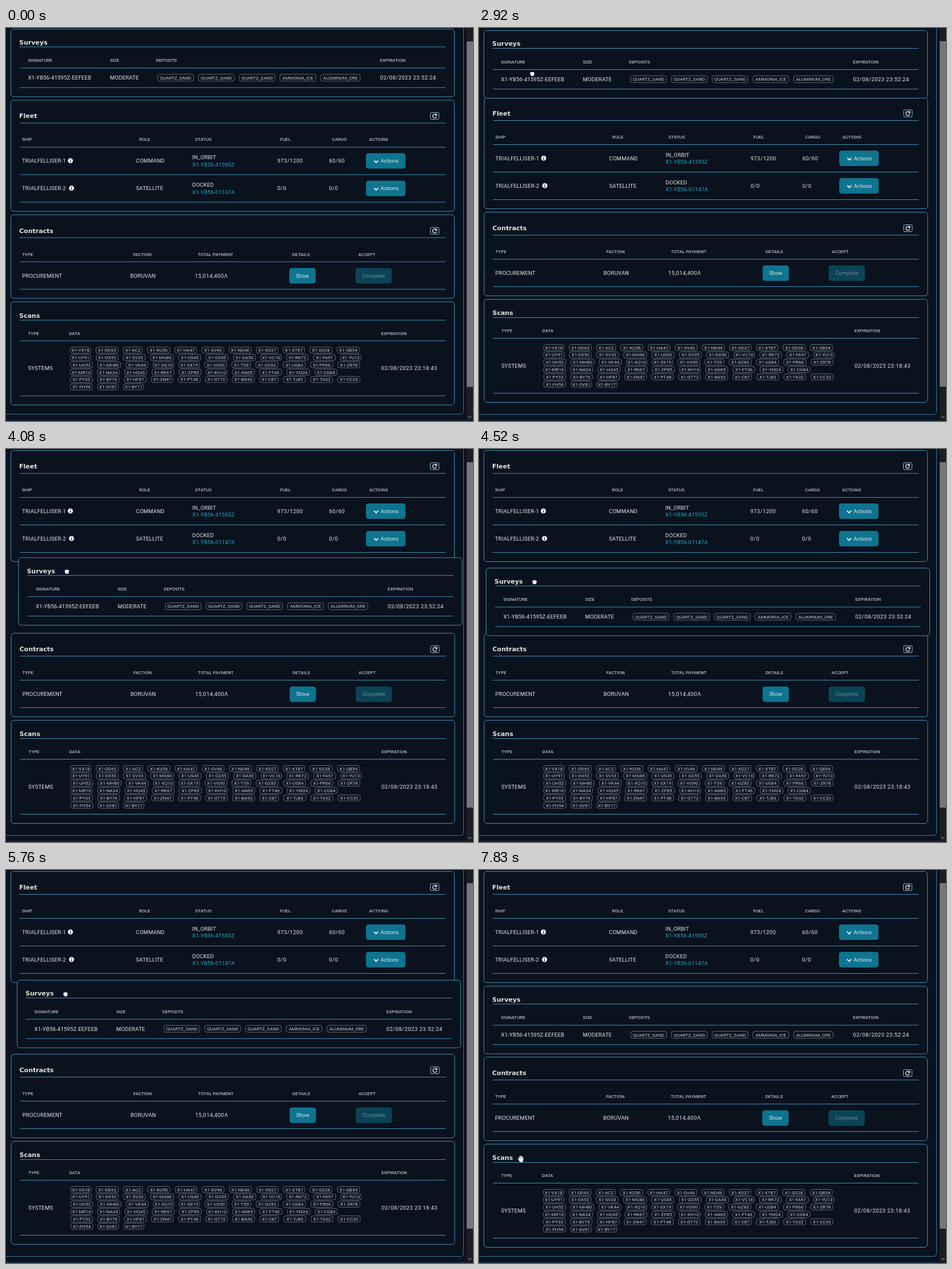
These frames come from a looping animation (816x686 px, 8000 ms). An HTML page:

```html
<!DOCTYPE html>
<html lang="en">
<head>
<meta charset="utf-8">
<title>Fleet dashboard</title>
<style>
html, body { margin: 0; width: 100%; height: 100%; overflow: hidden; background: #0a121e; }
svg { display: block; }
text { font-family: Roboto, "Liberation Sans", sans-serif; fill: #e4e6e8; white-space: pre; }
.title { font-family: "DejaVu Sans", sans-serif; font-weight: bold; fill: #dfe6dc; }
.num { letter-spacing: .4px; }
.cell { letter-spacing: .14px; }
.link { fill: #25a3c4; letter-spacing: .14px; }
.mid { text-anchor: middle; }
.tag { text-anchor: middle; fill: #cbced2; }
.off { text-anchor: middle; fill: #6d8a96; }
.box { fill: #0a121e; stroke: #4190b4; }
.rule { stroke: #4190b4; }
.chip { fill: none; stroke: #646a72; }
.icon { fill: none; stroke: #e8f0f2; stroke-width: 1.3; }
</style>
</head>
<body>
<svg id="stage" width="816" height="686" viewBox="0 0 816 686"></svg>
<script>
const rect = (x, y, w, h, r, attrs) =>
  `<rect x="${x}" y="${y}" width="${w}" height="${h}" rx="${r}" ${attrs}/>`;
// Text is placed by the middle of its capitals.
const text = (x, cy, s, size = 9.6, cls = 'cell') =>
  `<text x="${x}" y="${cy + size * .355}" font-size="${size}" class="${cls}">${s}</text>`;
const rules = (...ys) => ys.map(y => `<path class="rule" d="M24 ${y}H768"/>`).join('');
const heads = (cy, cols) => Object.entries(cols).map(([s, x]) => text(x, cy, s, 8, '')).join('');
const panel = (id, y, h, titleY, body) =>
  `<g id="${id}">${rect(8.5, y, 775, h, 5, 'class="box"')}${text(23, titleY, id, 11, 'title')}${body}</g>`;
const button = (x, cy, w, s, on = true) =>
  rect(x, cy - 13.5, w, 27, 4.5, `fill="${on ? '#0e7490' : '#0c4357'}"`) +
  text(x + w / 2, cy, s, 9.3, on ? 'mid' : 'off');
const chip = (x, cy, w, h, s) =>
  rect(x + .5, cy - h / 2, w - 1, h, 3.5, 'class="chip"') + text(x + w / 2, cy, s, 8.1, 'tag');
const refresh = cy =>
  rect(741.5, cy - 6, 15, 12, 2, 'class="icon" style="stroke:#8fb9c9;stroke-width:1"') +
  `<path class="icon" d="M751.6 ${cy - 2.2}a3.5 3.5 0 1 0 .7 3.6M752.5 ${cy - 4}v3h-3"/>`;

// Chips flow from the left, each as wide as its letters.
function chipRow(x, cy, h, gap, labels, width) {
  return labels.split(' ').map(s => {
    const w = width(s), out = chip(x, cy, w, h, s);
    x += w + gap;
    return out;
  }).join('');
}

function ship(cy, name, infoX, role, status, place, fuel, cargo) {
  return text(28, cy, name) +
    `<circle cx="${infoX}" cy="${cy - .3}" r="4.4" fill="#fff"/>` +
    `<path d="M${infoX} ${cy - 3}v1.4m0 1v3.2" stroke="#0a121e" stroke-width="1.5"/>` +
    text(227, cy, role) + text(325.5, cy - 6, status) + text(325.5, cy + 6.5, place, 9.6, 'link') +
    text(474, cy, fuel, 9.6, 'num') + text(564.5, cy, cargo, 9.6, 'num') +
    rect(629, cy - 13.5, 69, 27, 4.5, 'fill="#0e7490"') +
    `<path class="icon" style="stroke-width:1.8" d="M643 ${cy - .8}l3.7 3.7 3.7-3.7"/>` +
    text(654.5, cy, 'Actions', 9.3, '');
}

const systems = [
  'VX18 DD63 AC2 KU56 HA47 SV46 ND46 XD27 XT87 SG28 QB54',
  'UY91 DX53 SV33 MG86 US45 GS55 DA50 VC16 RK72 FA97 YU13',
  'UH52 MH80 VK44 XQ10 SX19 VG90 TS9 GZ83 US84 PR66 ZR78',
  'MR16 NA34 HQ45 RK67 ZP85 KH10 AN65 FT46 YM24 CG84',
  'PY33 BY76 HF87 ZN47 PT48 GT72 BA93 C87 TJ83 TA32 CC33',
  'FH54 SV81 BY17'
];
const advance = { 1: 3, 7: 4.8, T: 5, V: 5, X: 5, Y: 5, M: 7 };
const systemWidth = s => [...s.slice(3)].reduce((w, c) => w + (advance[c] || 5.4), 18.2);
const systemChips = systems.map((row, i) =>
  chipRow(112, 562.8 + 12.8 * i, 10.6, 8, row.replace(/\S+/g, 'X1-$&'), systemWidth)).join('');

const fleet = panel('Fleet', 126.5, 194, 154, refresh(154) + rules(166.5, 208.5, 256.5, 304.5) +
  heads(195, { SHIP: 28, ROLE: 232.5, STATUS: 330.5, FUEL: 479, CARGO: 569.5, ACTIONS: 634.5 }) +
  ship(232.5, 'TRIALFELLISER-1', 112.5, 'COMMAND', 'IN_ORBIT', 'X1-YB56-41595Z', '973/1200', '60/60') +
  ship(280.5, 'TRIALFELLISER-2', 114.5, 'SATELLITE', 'DOCKED', 'X1-YB56-01147A', '0/0', '0/0'));

const contracts = panel('Contracts', 326.5, 146, 354.5, refresh(354.5) + rules(366.5, 408.5, 456.5) +
  heads(395.5, { TYPE: 28, FACTION: 222, 'TOTAL PAYMENT': 335, DETAILS: 500, ACCEPT: 615.5 }) +
  text(28, 433, 'PROCUREMENT') + text(217, 433, 'BORUVAN') + text(330, 433, '15,014,400Λ', 9.6, 'num') +
  button(495, 433, 46, 'Show') + button(610.5, 433, 63.5, 'Complete', false));

const scans = panel('Scans', 478.5, 180, 502.5, rules(510.5, 546.5, 642.5) +
  heads(533.5, { TYPE: 38.5, DATA: 110, EXPIRATION: 655.5 }) +
  text(38.5, 594.5, 'SYSTEMS') + systemChips + text(655.5, 594.5, '02/08/2023 23:18:43', 9.6, 'num'));

const surveys = panel('Surveys', 2.5, 118, 25.5, rules(33.5, 70.5, 104.5) +
  heads(57, { SIGNATURE: 38.5, SIZE: 181.5, DEPOSITS: 262, EXPIRATION: 653.5 }) +
  text(38.5, 87.5, 'X1-YB56-41595Z-EEFEEB') + text(181.5, 87.5, 'MODERATE') +
  chipRow(264.5, 87.3, 12, 7.6, 'QUARTZ_SAND QUARTZ_SAND QUARTZ_SAND AMMONIA_ICE ALUMINUM_ORE',
    s => 6.4 * s.length - 6.8) +
  text(653.5, 87.5, '02/08/2023 23:52:24', 9.6, 'num'));

const stage = document.getElementById('stage');
stage.innerHTML =
  `<g id="page"><path d="M799.5-9V669q0 5.5-6 5.5H0" fill="none" stroke="#37799a"/>
  ${fleet}${contracts}${scans}${surveys}</g>
  <path d="M0 684.5H805" stroke="#17384c"/>
  <path d="M805 0h11v686h-11z" fill="#1d1e20"/>
  <path id="thumb" d="M805 23h11v603h-11z" fill="#777"/>
  <path d="M807.8 677.5l2.7 2.7 2.7-2.7" fill="none" stroke="#777" stroke-width="1.2"/>
  <g id="cursor" stroke="#fff" fill="#fff" stroke-linecap="round" stroke-linejoin="round">
    <path id="open" d="M-2.5 0v-3.6M-.6 0v-4.8M1.4 0v-4.6M3.3 1v-4M-4.6-.6L-2 3.5M-2.5 0H3.3L2.6 4.6H-1.2L-2.8 2z" stroke-width="1.5"/>
    <path id="closed" d="M-2.8-2.2L-1-2.6 1-2.6 2.9-2V.5L1.9 2.8H-1.2L-2.9.8z" stroke-width="1.4"/>
  </g>`;

const $ = id => document.getElementById(id);
const move = (id, x, y) => $(id).setAttribute('transform', `translate(${x} ${y})`);
const show = (id, on) => $(id).setAttribute('visibility', on ? 'visible' : 'hidden');

function draw(t) {
  // Motion advances in steps; step 0 is when the panel is grabbed.
  const k = Math.floor((t - 2031) / 88.7);
  const part = (a, b) => Math.min(1, Math.max(0, (k - a) / (b - a)));
  const ease = (a, b) => part(a, b) ** 2 * (3 - 2 * part(a, b));
  const bump = (a, b) => Math.sin(Math.PI * part(a, b)) ** 2;

  const scroll = k < 0 ? -.5 : 0, held = k >= 0 && k <= 48;
  const lifted = k > 3 && k < 54 ? 1 : 0;
  const down = ease(9, 26.15), up = ease(30, 42), drop = ease(48, 52);

  const x = (3.5 + .5 * lifted) * down + 12 * bump(14, 28) + 8 * bump(30, 42) + 7 * up -
    17 * bump(42, 48) - 10.5 * drop;
  const y = (200.4 + 5 * lifted) * down + 110 * bump(30, 42) - 15.5 * (up - drop);
  const fleetUp = ease(17, 21), gap = lifted * (1 - fleetUp);
  const swap = ease(32, 35) - ease(38, 42);

  move('page', 0, scroll);
  move('thumb', 0, -scroll);
  move('Surveys', x, y);
  move('Fleet', .5 * gap, -124 * fleetUp - 5 * gap);
  move('Contracts', .5 * lifted, -5 * lifted - 119 * swap);
  move('Scans', .5 * lifted, -5 * lifted);

  // The panel lags behind the pointer at first; after the drop the pointer leaves.
  const lag = 52 * (ease(0, 3) - ease(9, 22));
  const away = ease(48, 53), left = ease(53, 54), last = ease(60, 65);
  move('cursor',
    93 + x - (k < -8 ? 45 : 0) + 12 * away - 38 * left + 4 * last + 9 * bump(60, 66),
    27 + y + lag + 107 * away + 28 * left - 4 * bump(56, 60) + 142 * last);
  show('open', t >= 1310 && !held);
  show('closed', held);
}

const start = performance.now();
function tick() {
  draw((performance.now() - start) % 8000);
  requestAnimationFrame(tick);
}
tick();
</script>
</body>
</html>
```
